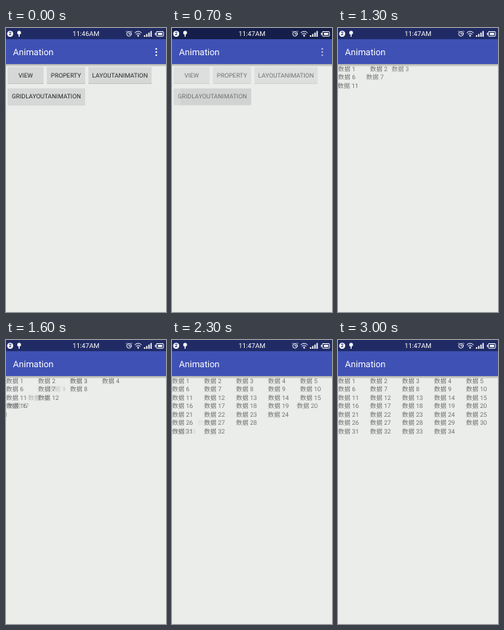
Recreate the animation shown at these times as an HTML page. Size 200 by 355 pixels, loop 3200 ms.

```html
<!DOCTYPE html>
<html lang="en">
<head>
<meta charset="utf-8">
<title>Grid layout animation</title>
<style>
  html, body { margin: 0; width: 100%; height: 100%; overflow: hidden; background: #ebedeb; }
  svg { display: block; width: 100%; height: 100%; }
  text {
    font-family: Roboto, "Noto Sans CJK SC", "Noto Sans CJK", sans-serif;
    text-rendering: geometricPrecision;
    white-space: pre;
  }
  .label { font-size: 7.7px; fill: #252525; text-anchor: middle; }
  .cell { font-size: 7.78px; fill: #000; fill-opacity: .52; }
  .line { fill: none; stroke: #fff; stroke-linecap: round; }
</style>
</head>
<body>
<svg viewBox="0 0 200 355" preserveAspectRatio="none">
  <defs>
    <linearGradient id="shade" x2="0" y2="1">
      <stop offset="0" stop-color="#000" stop-opacity=".3"/>
      <stop offset="1" stop-color="#000" stop-opacity="0"/>
    </linearGradient>
    <clipPath id="pressArea"><rect x="2" y="75.5" width="97" height="20.6" rx="1"/></clipPath>
  </defs>
  <rect width="200" height="355" fill="#ebedeb"/>

  <g id="menu">
    <g id="buttons"></g>
    <g clip-path="url(#pressArea)">
      <rect id="press" x="2" y="75" width="97" height="22" opacity="0"/>
      <circle id="ripple" cx="59" cy="86" r="0" opacity=".06"/>
    </g>
    <g id="labels"></g>
  </g>
  <g id="grid"></g>

  <rect y="45" width="200" height="3.6" fill="url(#shade)"/>
  <rect y="13" width="200" height="32" fill="#3f51b5"/>
  <rect width="200" height="14" fill="#202b66"/>
  <rect id="dim" width="200" height="14" fill="#0f1739"/>
  <text x="8.8" y="34.3" font-size="11.11" fill="#fff">Animation</text>
  <g id="dots" fill="#fff">
    <circle cx="187.8" cy="26.2" r="1.1"/>
    <circle cx="187.8" cy="30.1" r="1.1"/>
    <circle cx="187.8" cy="34" r="1.1"/>
  </g>

  <g id="status" fill="#fff">
    <circle cx="5.2" cy="7.2" r="3.7"/>
    <text x="5.2" y="9.3" font-size="6" font-weight="700" text-anchor="middle" style="fill:#202b66">2</text>
    <circle cx="16.4" cy="6" r="2.4"/>
    <rect x="15.8" y="7" width="1.2" height="4"/>
    <text id="clock" x="100" y="10.3" font-size="8.4" text-anchor="middle"></text>
    <g class="line" stroke-width=".9">
      <circle cx="153.8" cy="7.3" r="2.9"/>
      <path d="M153.8 5.8v1.7h1.3M151 3.9l-.5.5M156.6 3.9l.5.5"/>
      <path d="M161.2 5.8q4-3.5 8 0M162.7 7.6q2.5-2.1 5 0"/>
    </g>
    <circle cx="165.2" cy="9.7" r="1.1"/>
    <path d="M172.5 9h1.6v2h-1.6zM175.2 7.5h1.6v3.5h-1.6zM177.9 5.8h1.6v5.2h-1.6zM180.6 3.8h1.6v7.2h-1.6z"/>
    <rect class="line" x="188" y="4.5" width="8.8" height="5.8" rx=".8" stroke-width=".9"/>
    <rect x="190" y="6" width="5.2" height="2.8"/>
    <rect x="186.2" y="6.2" width="1.4" height="2.4"/>
  </g>
</svg>
<script>
const LOOP = 3200;
const COLUMNS = 5, ITEMS = 34;
const GRID = { start: 692, shown: 1150, duration: 250, columnDelay: 209, rowDelay: 185, slide: 100 };

const byId = id => document.getElementById(id);
const clamp = v => Math.min(1, Math.max(0, v));
const ramp = (t, from, to) => clamp((t - from) / (to - from));
const easeInOut = p => (1 - Math.cos(Math.PI * p)) / 2;

function add(parent, tag, attrs, content = "") {
  const node = document.createElementNS("http://www.w3.org/2000/svg", tag);
  for (const key in attrs) node.setAttribute(key, attrs[key]);
  node.textContent = content;
  parent.append(node);
  return node;
}

function addButton(label, x, y, width) {
  const box = { x, width, height: 20.4, rx: 1 };
  add(byId("buttons"), "rect", { ...box, y: y + .7, fill: "#000", opacity: .2 });
  add(byId("buttons"), "rect", { ...box, y, fill: "#d6d7d7" });
  add(byId("labels"), "text", { class: "label", x: x + width / 2, y: y + 12.8 }, label);
}

addButton("VIEW", 2, 48.8, 45);
addButton("PROPERTY", 51, 48.8, 48);
addButton("LAYOUTANIMATION", 103, 48.8, 79);
addButton("GRIDLAYOUTANIMATION", 2, 75.5, 97);

const cells = Array.from({ length: ITEMS }, (_, i) => {
  const column = i % COLUMNS, row = Math.floor(i / COLUMNS);
  const node = add(byId("grid"), "text", { class: "cell", y: 53.6 + row * 10.55 }, `数据 ${i + 1}`);
  const begin = GRID.start + column * GRID.columnDelay + row * GRID.rowDelay;
  return { node, begin, x: column * 40 };
});

function draw(t) {
  byId("clock").textContent = t < 200 ? "11:46AM" : "11:47AM";

  const leaving = 1 - ramp(t, 640, 800);
  byId("menu").setAttribute("opacity", leaving);
  byId("dots").setAttribute("opacity", leaving);
  byId("dim").setAttribute("opacity", leaving * ramp(t, 50, 250));
  byId("press").setAttribute("opacity", .04 * ramp(t, 350, 500));
  byId("ripple").setAttribute("r", 55 * ramp(t, 400, 740));

  byId("grid").setAttribute("visibility", t < GRID.shown ? "hidden" : "visible");
  for (const { node, begin, x } of cells) {
    const p = easeInOut(clamp((t - begin) / GRID.duration));
    node.setAttribute("x", x - GRID.slide * (1 - p));
    node.setAttribute("opacity", p);
  }
}

const origin = performance.now();
function tick() {
  draw((performance.now() - origin) % LOOP);
  requestAnimationFrame(tick);
}
tick();
</script>
</body>
</html>
```
